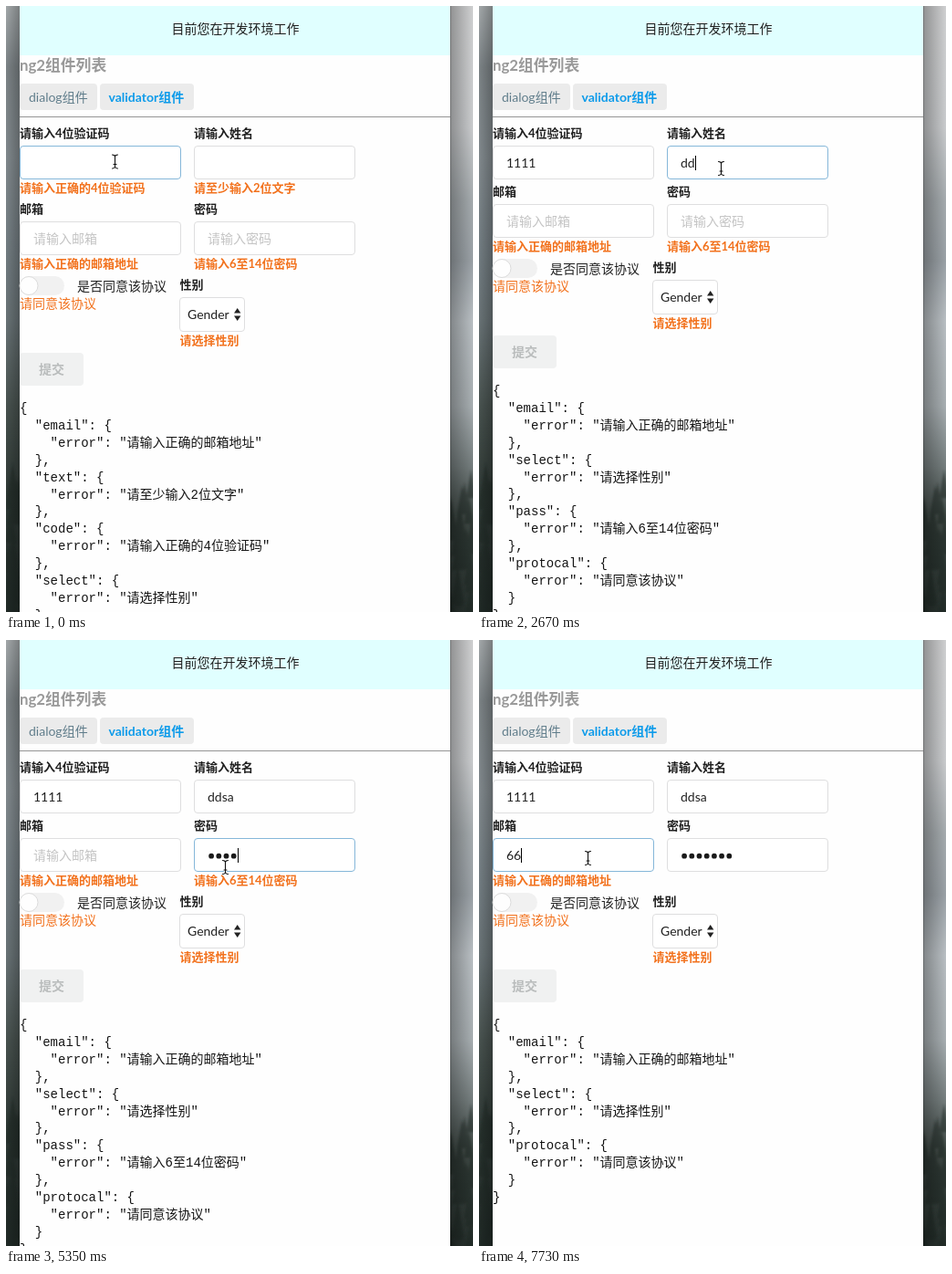
An HTML page for the animation above (8 s loop, 512x664 px).

```html
<!DOCTYPE html>
<html lang="zh-CN">
<head>
<meta charset="utf-8">
<title>表单验证</title>
<style>
  html, body { margin: 0; width: 100%; height: 100%; overflow: hidden; background: #fefefe; }
  svg { display: block; width: 512px; height: 664px; }
  text { font: 14px Lato, "Noto Sans CJK SC", sans-serif; fill: #202020; white-space: pre; }
  .title { font-size: 16.8px; font-weight: 700; fill: #999; }
  .label { font-size: 13px; font-weight: 700; fill: #1f1f1f; }
  .error { font-size: 13px; font-weight: 700; fill: #f2711c; }
  .note { fill: #f2711c; }
  .hint { fill: #c4c4c4; }
  .tab { fill: #607d8b; }
  .active { fill: #0d9bea; font-weight: 700; }
  .submit { fill: #b9bcbc; font-weight: 700; }
  .code { font-family: "Liberation Mono", "Noto Sans CJK SC", monospace; fill: #141414; }
  .box { fill: #fff; stroke: #dededf; }
  .box.focus { stroke: #85b7d9; }
  .halo { stroke: #fff; stroke-width: 2.4; }
  .ink { stroke: #111; stroke-width: 1.1; }
</style>
</head>
<body>
<svg viewBox="0 0 512 664">
  <defs>
    <linearGradient id="cliff" x2="0" y2="1">
      <stop offset="0" stop-color="#a3a8aa"/>
      <stop offset=".1" stop-color="#7b8285"/>
      <stop offset=".25" stop-color="#80888c"/>
      <stop offset=".4" stop-color="#727c81"/>
      <stop offset=".52" stop-color="#687275"/>
      <stop offset=".66" stop-color="#48524f"/>
      <stop offset=".8" stop-color="#303a36"/>
      <stop offset="1" stop-color="#242d2a"/>
    </linearGradient>
    <linearGradient id="valley" x2="0" y2="1">
      <stop offset="0" stop-color="#cfd0d1"/>
      <stop offset=".2" stop-color="#c9cbcd"/>
      <stop offset=".32" stop-color="#a5abae"/>
      <stop offset=".42" stop-color="#9aa1a6"/>
      <stop offset=".52" stop-color="#b9bfc3"/>
      <stop offset=".66" stop-color="#a7aeb1"/>
      <stop offset=".76" stop-color="#747d7d"/>
      <stop offset=".84" stop-color="#414b47"/>
      <stop offset="1" stop-color="#28322e"/>
    </linearGradient>
    <linearGradient id="shadeL">
      <stop offset="0" stop-color="#000" stop-opacity="0"/>
      <stop offset="1" stop-color="#000" stop-opacity=".25"/>
    </linearGradient>
    <linearGradient id="shadeR">
      <stop offset="0" stop-color="#000" stop-opacity=".3"/>
      <stop offset="1" stop-color="#000" stop-opacity="0"/>
    </linearGradient>
    <filter id="soft"><feGaussianBlur stdDeviation="1.2"/></filter>
    <path id="beam" d="M-3 -7.5Q-.4 -7.5 0 -5.5Q.4 -7.5 3 -7.5M0 -5.5V5.5M-3 7.5Q-.4 7.5 0 5.5Q.4 7.5 3 7.5M-1.5 3H1.5"/>
  </defs>

  <g id="scenery">
    <rect width="15" height="664" fill="url(#cliff)"/>
    <rect x="487" width="25" height="664" fill="url(#valley)"/>
    <g id="trees" fill="#1e2724" filter="url(#soft)" opacity=".5"></g>
    <rect width="15" height="664" fill="url(#shadeL)"/>
    <rect x="487" width="25" height="664" fill="url(#shadeR)"/>
  </g>

  <rect x="15" width="472" height="664" fill="#fefefe"/>
  <rect x="487" width="1" height="664" fill="#000" opacity=".2"/>
  <rect x="15" width="472" height="54" fill="#e0ffff"/>
  <text x="251.5" y="30" text-anchor="middle">目前您在开发环境工作</text>
  <text class="title" x="15" y="71">ng2组件列表</text>
  <rect x="15" y="85" width="85" height="29" rx="4" fill="#ebebeb"/>
  <text class="tab" x="25" y="105">dialog组件</text>
  <rect x="103" y="85" width="103" height="29" rx="4" fill="#ebebeb"/>
  <text class="active" x="112.5" y="105">validator组件</text>
  <rect x="15" y="121" width="472" height="1" fill="#959595"/>

  <g id="top"></g>
  <g id="rest">
    <g id="bottom"></g>
    <rect x="15" y="296" width="49" height="21" rx="10.5" fill="#f1f1f1"/>
    <circle cx="25" cy="306.5" r="10" fill="#fefefe" stroke="#dcdcdc"/>
    <text x="78" y="312">是否同意该协议</text>
    <text class="note" x="15" y="331">请同意该协议</text>
    <text class="label" x="190.5" y="310">性别</text>
    <rect class="box" x="190.5" y="319.5" width="71" height="37" rx="3.5"/>
    <text x="199" y="343">Gender</text>
    <path d="M250 336.5h7.4l-3.7-5.5zM250 339.5h7.4l-3.7 5.5z" fill="#222"/>
    <text class="error" x="190.5" y="371">请选择性别</text>
    <rect x="15" y="380" width="70" height="36" rx="4" fill="#f0f1f1"/>
    <text class="submit" x="36" y="403">提交</text>
    <g id="json"></g>
  </g>

  <rect id="caret" width="1" height="16" fill="#000"/>
  <g id="mouse" fill="none" stroke-linecap="round">
    <use href="#beam" class="halo"/>
    <use href="#beam" class="ink"/>
  </g>
</svg>
<script>
const LOOP = 8000, SHIFT = 19, DOT = 8.2;
const $ = id => document.getElementById(id);

function add(parent, tag, attrs, text = '') {
  const el = document.createElementNS('http://www.w3.org/2000/svg', tag);
  for (const k in attrs) el.setAttribute(k, attrs[k]);
  el.textContent = text;
  return parent.appendChild(el);
}

const show = (el, on) => el.setAttribute('visibility', on ? 'visible' : 'hidden');

// Fields: left edge, top edge, minimum length
const fields = {
  code:  { x: 15,  y: 153, min: 4,  label: '请输入4位验证码', error: '请输入正确的4位验证码' },
  text:  { x: 206, y: 153, min: 2,  label: '请输入姓名', error: '请至少输入2位文字' },
  email: { x: 15,  y: 236, min: 9,  label: '邮箱', hint: '请输入邮箱', error: '请输入正确的邮箱地址' },
  pass:  { x: 206, y: 236, min: 6,  label: '密码', hint: '请输入密码', error: '请输入6至14位密码' }
};

for (const f of Object.values(fields)) {
  const g = $(f.y < 200 ? 'top' : 'bottom');
  add(g, 'text', { class: 'label', x: f.x, y: f.y - 9 }, f.label);
  f.box = add(g, 'rect', { x: f.x + .5, y: f.y + .5, width: 176, height: 36, rx: 3.5 });
  f.ghost = add(g, 'text', { class: 'hint', x: f.x + 15, y: f.y + 24 }, f.hint);
  f.value = add(g, 'text', { x: f.x + 15, y: f.y + 24 });
  f.dots = add(g, 'g', {});
  f.note = add(g, 'text', { class: 'error', x: f.x, y: f.y + 51 }, f.error);
}

// Each step changes part of the state from its time on
const steps = [
  [0,    { code: '', text: '', email: '', pass: '', focus: 'code', caret: false, mouse: [119, 170.5] }],
  [450,  { code: '1', caret: true }],
  [600,  { code: '11' }],
  [900,  { code: '111' }],
  [1040, { code: '1111' }],
  [1190, { mouse: [150, 173] }],
  [1340, { mouse: [222, 176] }],
  [1490, { mouse: [265, 178] }],
  [1630, { focus: 'text' }],
  [2080, { caret: false }],
  [2370, { text: 'd', caret: true }],
  [2670, { text: 'dd' }],
  [2820, { text: 'dds' }],
  [3270, { text: 'ddsa' }],
  [3420, { mouse: [259, 196] }],
  [3570, { mouse: [244, 238] }],
  [3700, { mouse: [240, 249] }],
  [3850, { focus: 'pass' }],
  [4300, { caret: false }],
  [4600, { pass: 'a', caret: true }],
  [4750, { pass: 'aa' }],
  [4900, { pass: 'aaa' }],
  [5350, { pass: 'aaaa' }],
  [5800, { pass: 'aaaaa' }],
  [6090, { pass: 'aaaaaa' }],
  [6240, { pass: 'aaaaaaa' }],
  [6540, { mouse: [160, 243] }],
  [6680, { mouse: [119, 239], caret: false }],
  [6980, { focus: 'email', caret: true }],
  [7580, { email: '6' }],
  [7730, { email: '66' }]
];

function drawJson(errors) {
  const lines = ['{'];
  errors.forEach(([key, msg], i) => lines.push(
    `  "${key}": {`, `    "error": "${msg}"`, i < errors.length - 1 ? '  },' : '  }'));
  lines.push('}');
  $('json').textContent = '';
  lines.forEach((s, i) => add($('json'), 'text', { class: 'code', x: 15, y: 444.7 + i * 18.96 }, s));
}

function draw(s) {
  const bad = key => s[key].length < fields[key].min;
  const up = bad('code') || bad('text') ? 0 : SHIFT;
  $('rest').setAttribute('transform', `translate(0 ${-up})`);

  for (const key in fields) {
    const f = fields[key], val = s[key], secret = key === 'pass';
    f.box.setAttribute('class', s.focus === key ? 'box focus' : 'box');
    f.value.textContent = secret ? '' : val;
    f.dots.textContent = '';
    if (secret) for (let i = 0; i < val.length; i++)
      add(f.dots, 'circle', { cx: f.x + 15 + DOT * (i + .5), cy: f.y + 19.7, r: 2.9, fill: '#1a1a1a' });
    show(f.ghost, !val);
    show(f.note, bad(key));
  }

  const errors = ['email', 'text', 'code'].filter(bad).map(k => [k, fields[k].error]);
  errors.push(['select', '请选择性别']);
  if (bad('pass')) errors.push(['pass', fields.pass.error]);
  errors.push(['protocal', '请同意该协议']);
  drawJson(errors);

  const f = fields[s.focus], val = s[s.focus];
  const len = s.focus === 'pass' ? val.length * DOT : val ? f.value.getComputedTextLength() : 0;
  $('caret').setAttribute('x', Math.round(f.x + 15 + len));
  $('caret').setAttribute('y', f.y + 11 - (f.y > 200 ? up : 0));
  show($('caret'), s.caret);
  $('mouse').setAttribute('transform', `translate(${s.mouse[0] + .5} ${s.mouse[1]})`);
}

function plantTrees() {
  let seed = 7;
  const rnd = () => (seed = seed * 16807 % 2147483647) / 2147483647;
  for (let i = 0; i < 40; i++) {
    const x = i % 2 ? rnd() * 15 : 487 + rnd() * 25;
    const y = 500 + rnd() * 150, h = 20 + rnd() * 30;
    add($('trees'), 'path', { d: `M${x} ${y}l${h / 6} ${h}h${-h / 3}z` });
  }
}

let last = -1;
function tick() {
  const t = performance.now() % LOOP;
  const n = steps.filter(([at]) => at <= t).length;
  if (n !== last) {
    last = n;
    draw(Object.assign({}, ...steps.slice(0, n).map(([, change]) => change)));
  }
  requestAnimationFrame(tick);
}

plantTrees();
tick();
</script>
</body>
</html>
```
